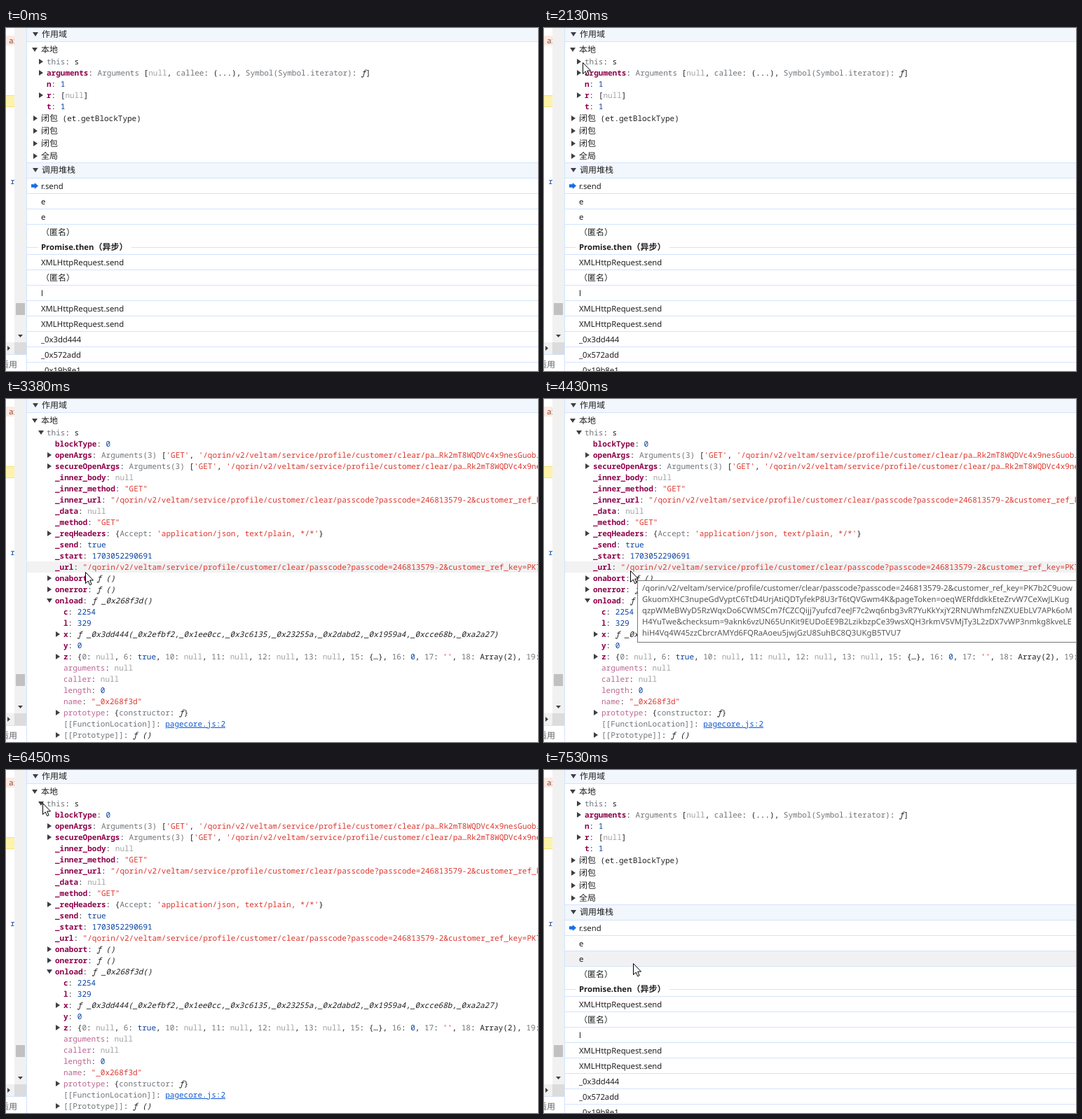
Recreate the animation shown at these times as an HTML page. Size 759 px wide and 490 px high, loop 8 s.

```html
<!DOCTYPE html>
<html lang="zh-CN">
<head>
<meta charset="utf-8">
<title>Debugger scope panel</title>
<style>
html, body { margin: 0; width: 100%; height: 100%; overflow: hidden; background: #fff; }
#stage { position: relative; width: 759px; height: 490px; overflow: hidden; text-rendering: geometricPrecision; }
#stage div { position: absolute; }
.row { height: 16px; line-height: 16px; white-space: pre; color: #1f1f1f; }
.mono { font: 11px/16px "Noto Sans Mono", "DejaVu Sans Mono", monospace; }
.sans { font: 11.3px/16px "Noto Sans", "Open Sans", sans-serif; }
.bold, .own { font-weight: 700; }
.cjk { font: 12px/0 "Noto Sans CJK SC", "Noto Sans CJK", "Noto Sans CJK JP", sans-serif; font-weight: inherit; }
.own { color: #8e004b; }
.dim { color: #8e004b; opacity: .6; font-weight: 500; }
.syn, .key { color: #70757a; }
.str { color: #dc362e; }
.nul { color: #a3a3a3; }
.num { color: #0842a0; }
.fn { font-style: italic; }
.link { color: #0b57d0; text-decoration: underline; }
.tri { width: 6px; height: 8px; background: #3c4043; clip-path: polygon(0 0, 100% 50%, 0 100%); }
#tip { left: 133px; top: 259px; width: 636px; height: 89px; box-sizing: border-box; overflow: hidden;
  padding: 3px 12px 0 6px; background: #fff; border: 1px solid #767676; color: #575757; word-break: break-all; }
#cursor { position: absolute; left: 0; top: 0; overflow: visible; }
</style>
</head>
<body>
<div id="stage"></div>
<script>
const stage = document.getElementById('stage');
const LINE = '#d3e3fd', HEAD = '#f2f6fd', HOVER = '#f1f1f3';

function add(parent, cls, css, html = '') {
  const el = document.createElement('div');
  el.className = cls;
  el.style.cssText = css;
  el.innerHTML = html;
  return parent.appendChild(el);
}
const box = (parent, x, y, w, h, color, more = '') =>
  add(parent, '', `left:${x}px;top:${y}px;width:${w}px;height:${h}px;background:${color};${more}`);
const span = (cls, s) => `<span class="${cls}">${s}</span>`;
const cjk = s => s.replace(/[\u3000-\u9fff\uff00-\uffef]+/g, m => span('cjk', m));
const text = (parent, x, y, html, cls = 'mono') =>
  add(parent, 'row ' + cls, `left:${x}px;top:${y - 7}px`, cjk(html));
const arrow = (parent, x, y, open) =>
  add(parent, 'tri', `left:${x - 3}px;top:${y - 4}px;transform:rotate(${open ? 90 : 0}deg)`);

// Colours a value the way an object preview does
function paint(v) {
  if (v[0] === 'ƒ') return span('fn', v);
  if (v.endsWith('.js:2')) return span('link', v);
  const parts = /("[^"]*"?|'[^']*'?)|(null)|(Arguments\S* |[\w().]+(?=:))|(\b\d+\b(?!\))|true)|(ƒ)/g;
  return v.replace(parts, (m, str, nul, key, num) =>
    span(str ? 'str' : nul ? 'nul' : key ? 'key' : num ? 'num' : 'fn', m));
}

// Prefixes: + closed, - open, ~ not enumerable, # synthetic
function prop(parent, x, y, spec) {
  const [, mark, kind, name, value] = spec.match(/^([+-]?)([~#]?)([^:]+): (.*)$/);
  const cls = { '~': 'dim', '#': 'syn' }[kind] || 'own';
  text(parent, x, y, span(cls, name) + ': ' + paint(value));
  return mark && arrow(parent, x - 8, y, mark === '-');
}

function header(parent, y, h, label, mid) {
  box(parent, 30, y, 729, h, HEAD);
  box(parent, 30, y + h, 729, 1, LINE);
  arrow(parent, 42, mid, true);
  text(parent, 51, mid, label, 'sans');
}

// Left strip: clipped editor and its scroll bars
const code = box(stage, 0, 0, 12, 449, '#fff', 'overflow:hidden');
box(code, 0, 11, 12, 14, '#fdeae3');
text(code, 4, 18, '<span style="color:#8c4a2f">ar</span>');
box(code, 0, 96, 12, 17, '#fdf3aa', 'box-sizing:border-box;border:solid #f6e27a;border-width:1px 0');
text(code, -7, 219, '* ' + span('num', 'r'));
box(stage, 12, 0, 17, 449, '#f1f1f1');
box(stage, 14, 393, 13, 17, '#c1c1c1');
box(stage, 17, 438, 7, 4, '#404040', 'clip-path:polygon(0 0,100% 0,50% 100%)');
box(stage, 0, 449, 12, 17, '#f1f1f1');
box(stage, 2, 454, 4, 7, '#404040', 'clip-path:polygon(0 0,100% 50%,0 100%)');
box(stage, 12, 449, 17, 17, '#dcdcdc');
box(stage, 0, 466, 29, 1, LINE);
text(stage, -8, 481, '<span style="color:#5f6368">适用</span>', 'sans');
box(stage, 29, 0, 1, 490, LINE);

// Parts that stay in both states
header(stage, 0, 19, '作用域', 9);
arrow(stage, 41, 31, true);
text(stage, 50, 31, '本地');
const shut = add(stage, '', 'left:0;top:0');
const open = add(stage, '', 'left:0;top:0');
const toggle = prop(stage, 58, 48, '+#this: s');

// Closed state: scopes and call stack
['+arguments: Arguments [null, callee: (...), Symbol(Symbol.iterator): ƒ]', 'n: 1', '+r: [null]', 't: 1']
  .forEach((s, i) => prop(shut, 58, 64 + 16 * i, s));
['闭包 (et.getBlockType)', '闭包', '闭包', '全局'].forEach((s, i) => {
  arrow(shut, 42, 129 + 18 * i);
  text(shut, 50, 129 + 18 * i, s);
});
box(shut, 30, 192, 729, 1, LINE);
header(shut, 193, 21, '调用堆栈', 203);
const hoverRows = [237, 259].map(y => box(shut, 30, y, 729, 21, HOVER));
const XHR = 'XMLHttpRequest.send';
['r.send', 'e', 'e', '（匿名）', '', XHR, '（匿名）', 'l', XHR, XHR, '_0x3dd444', '_0x572add', '_0x19b8e1']
  .forEach((s, i) => {
    const y = 226 + 22 * i - (i > 3 ? 1 : 0);
    if (s) text(shut, 50, y, s, 'sans');
    if (i !== 3) box(shut, 30, s ? y + 10 : 323, 729, 1, LINE);
  });
text(shut, 50, 313, 'Promise.then（异步）', 'sans bold');
box(shut, 30, 313, 16, 1, LINE);
box(shut, 179, 313, 580, 1, LINE);
box(shut, 36, 221, 10, 9, '#1a6be8',
  'clip-path:polygon(0 25%,48% 25%,48% 0,100% 50%,48% 100%,48% 75%,0 75%)');

// Open state: members of the object
const PATH = '/qorin/v2/veltam/service/profile/customer/clear/';
const URL_TEXT = PATH + 'passcode?passcode=246813579-2&customer_ref_key=PK7';
const CUT = `['GET', '${PATH}pa…Rk2mT8WQDVc4x9nesGuobJ`;
const urlHover = box(open, 30, 232, 729, 16, '#f2f2f2');
[
  'blockType: 0',
  '+openArgs: Arguments(3) ' + CUT,
  '+secureOpenArgs: Arguments(3) ' + CUT,
  '_inner_body: null',
  '_inner_method: "GET"',
  `_inner_url: "${URL_TEXT}`,
  '_data: null',
  '_method: "GET"',
  "+_reqHeaders: {Accept: 'application/json, text/plain, */*'}",
  '_send: true',
  '_start: 1703052290691',
  `_url: "${URL_TEXT}`,
  '+onabort: ƒ ()',
  '+onerror: ƒ ()',
  '-onload: ƒ _0x268f3d()'
].forEach((s, i) => prop(open, 70, 64 + 16 * i, s));
[
  'c: 2254',
  'l: 329',
  '+x: ƒ _0x3dd444(_0x2efbf2,_0x1ee0cc,_0x3c6135,_0x23255a,_0x2dabd2,_0x1959a4,_0xcce68b,_0xa2a27)',
  'y: 0',
  "+z: {0: null, 6: true, 10: null, 11: null, 12: null, 13: null, 15: {…}, 16: 0, 17: '', 18: Array(2), 19: null",
  '~arguments: null',
  '~caller: null',
  '~length: 0',
  '~name: "_0x268f3d"',
  '+~prototype: {constructor: ƒ}',
  '#[[FunctionLocation]]: pagecore.js:2',
  '+#[[Prototype]]: ƒ ()'
].forEach((s, i) => prop(open, 82, 304 + 16 * i, s));

// Tooltip with the complete request address
let seed = 7;
const CHARS = 'abcdefghijkmnopqrstuvwxyzABCDEFGHJKLMNPQRSTUVWXYZ23456789';
const token = n => Array.from({ length: n }, () =>
  CHARS[(seed = seed * 16807 % 2147483647) % CHARS.length]).join('');
const tip = add(stage, 'sans', '');
tip.id = 'tip';
tip.textContent = URL_TEXT + token(60) + '&pageToken=' + token(125) + '&checksum=' + token(130);

stage.insertAdjacentHTML('beforeend', `<svg id="cursor" width="13" height="20">
  <path d="M.5 .5V16.5L4.2 13L6.7 18.7L9.1 17.6L6.7 12H11.5Z" fill="#fff" stroke="#000"/></svg>`);
const cursor = document.getElementById('cursor');

// Pointer path: time, x, y
const MOVES = [
  [180, 290, 0], [400, 190, 110], [600, 80, 205], [720, 43, 231],
  [970, 43, 231], [1150, 36, 205], [1350, 112, 140], [1550, 78, 75], [1750, 56, 49], [1800, 55, 49],
  [2460, 55, 49], [2700, 58, 100], [2910, 68, 169], [3150, 92, 225], [3380, 113, 247],
  [3530, 114, 247], [3610, 123, 244], [3870, 123, 245],
  [5750, 123, 245], [5800, 110, 189], [5900, 70, 80], [6030, 56, 20],
  [6130, 56, 20], [6260, 56, 47], [6410, 56, 47], [6500, 47, 48],
  [6780, 47, 48], [7000, 62, 110], [7250, 100, 215], [7450, 124, 268], [7530, 127, 276]
];
function pointer(t) {
  const i = MOVES.findIndex(m => m[0] > t);
  if (i < 0) return MOVES[MOVES.length - 1].slice(1);
  const a = MOVES[Math.max(i - 1, 0)], b = MOVES[i];
  const k = Math.max(0, (t - a[0]) / (b[0] - a[0] || 1));
  return [1, 2].map(n => Math.round(a[n] + (b[n] - a[n]) * k));
}

const show = (el, on) => { el.style.visibility = on ? 'inherit' : 'hidden'; };
const within = (t, from, to) => t >= from && t < to;

function draw(now) {
  const t = now % 8000;
  const [x, y] = pointer(t);
  const expanded = within(t, 2210, 6730);
  show(open, expanded);
  show(shut, !expanded);
  const turning = within(t, 2210, 2260) || within(t, 6730, 6780);
  toggle.style.transform = `rotate(${turning ? 45 : expanded ? 90 : 0}deg)`;
  show(urlHover, within(t, 3200, 5850));
  hoverRows.forEach((row, i) => show(row, within(y, 237 + 22 * i, 259 + 22 * i)));
  show(tip, within(t, 4430, 5800));
  show(cursor, t >= 180);
  cursor.style.transform = `translate(${x}px, ${y}px)`;
  requestAnimationFrame(() => draw(performance.now() - start));
}
const start = performance.now();
draw(0);
</script>
</body>
</html>
```
